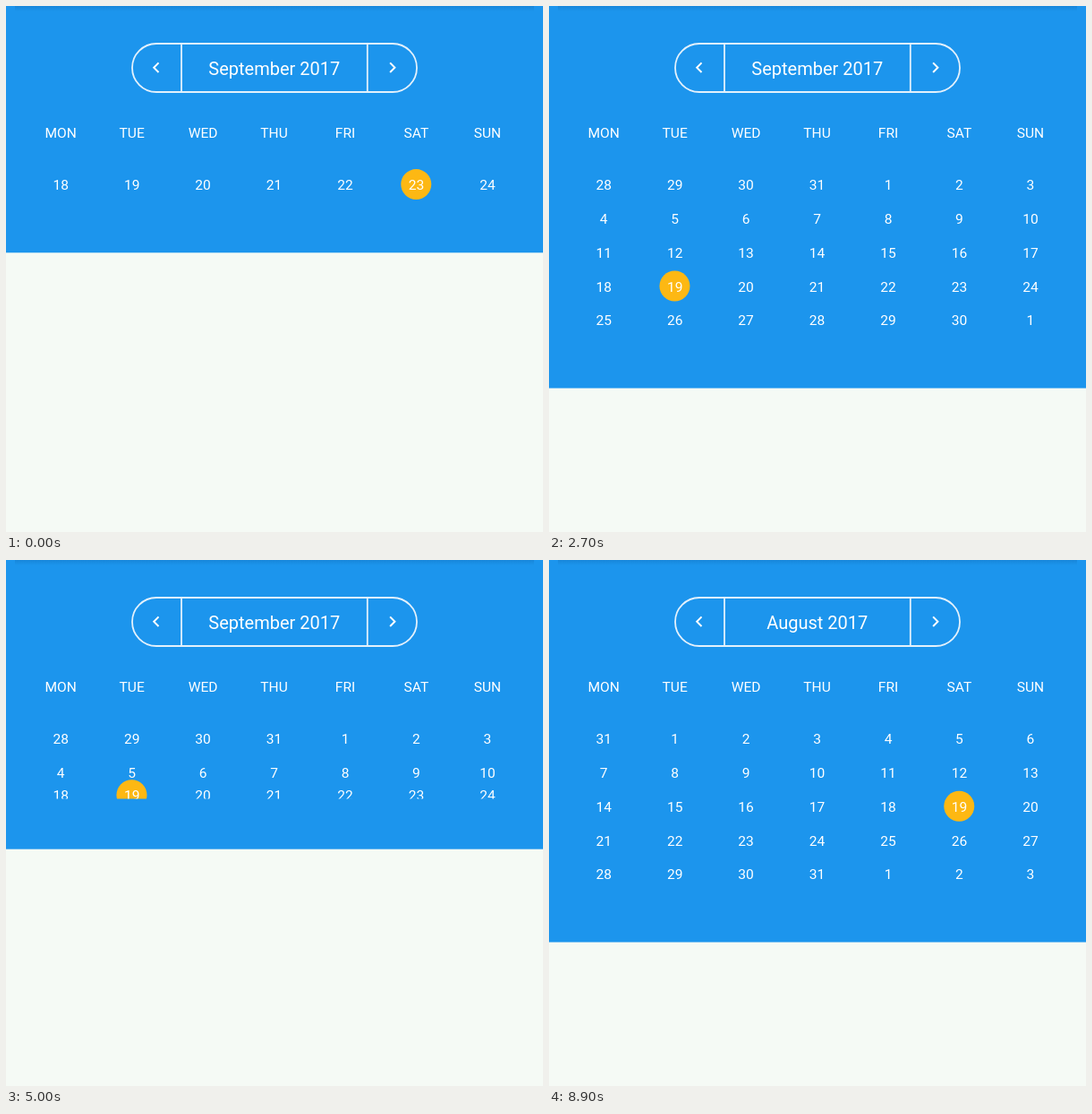
These frames come from a looping animation (600x587 px, 9 s). An HTML page:

```html
<!DOCTYPE html>
<html lang="en">
<head>
<meta charset="utf-8">
<title>Collapsible calendar</title>
<style>
  html, body { margin: 0; width: 100%; height: 100%; overflow: hidden; background: #f5faf5; }
  #stage { display: block; width: 600px; height: 587px; }
  text { font: 15.55px Roboto, sans-serif; fill: #fff; text-anchor: middle; }
  #title { font-size: 20px; }
  .outline { fill: none; stroke: #e3f1fc; stroke-width: 1.8; }
  .arrow { fill: #fff; }
  .dot { fill: #fdb813; }
</style>
</head>
<body>
<svg id="stage" viewBox="0 0 600 587">
  <defs>
    <linearGradient id="shade" x2="0" y2="1">
      <stop offset="0" stop-color="#0b5fa8" stop-opacity=".28"/>
      <stop offset="1" stop-color="#0b5fa8" stop-opacity="0"/>
    </linearGradient>
  </defs>
  <rect width="600" height="587" fill="#f5faf5"/>
  <rect id="panel" width="600" fill="#1c95ed"/>
  <rect x="10" width="580" height="6" fill="url(#shade)"/>
  <rect class="outline" x="141" y="42" width="318" height="54" rx="27"/>
  <path class="outline" d="M196 42v54M403.8 42v54"/>
  <path class="arrow" d="M171.2 64.1l-1.4-1.4-6 6 6 6 1.4-1.4-4.6-4.6z"/>
  <path class="arrow" d="M428.4 64.1l1.4-1.4 6 6-6 6-1.4-1.4 4.6-4.6z"/>
  <text id="title" x="299.8" y="77"></text>
  <g id="weekdays"></g>
  <svg id="weeks" y="180.4" width="600" overflow="hidden"></svg>
</svg>
<script>
const ROW = 37.8, WEEK_CLIP = 38.6, COLLAPSED = 275.3, LOOP = 9000, STEP = 100;
const columnX = i => 61.2 + 79.45 * i;
const clamp = (v, lo, hi) => Math.min(hi, Math.max(lo, v));
const byId = id => document.getElementById(id);

function add(parent, tag, attrs) {
  const node = document.createElementNS('http://www.w3.org/2000/svg', tag);
  for (const key in attrs) node.setAttribute(key, attrs[key]);
  return parent.appendChild(node);
}

'MON TUE WED THU FRI SAT SUN'.split(' ').forEach((name, i) => {
  add(byId('weekdays'), 'text', { x: columnX(i), y: 147.3 }).textContent = name;
});

const rows = Array.from({ length: 6 }, () => {
  const row = add(byId('weeks'), 'svg', { width: 600, overflow: 'hidden' });
  const dot = add(row, 'circle', { class: 'dot', cy: 18.7, r: 17 });
  const days = Array.from({ length: 7 }, (_, i) => add(row, 'text', { x: columnX(i), y: 24.9 }));
  return { row, dot, days };
});

// Month index and number of weeks on show
const SEPTEMBER = { name: 'September', month: 8, weeks: 5 };
const AUGUST = { name: 'August', month: 7, weeks: 5 };
const JULY = { name: 'July', month: 6, weeks: 6 };

// [time, openness] of the panel
const DRAG = [
  [0, 0], [2100, 0], [2200, .12], [2300, .404], [2400, .74], [2500, .95], [2600, 1],
  [3400, 1], [3500, .93], [3600, .78], [3700, .575], [3800, .36], [3900, .16], [4000, .04], [4100, 0],
  [4700, 0], [4900, .14], [5200, .66], [5400, .94], [5500, 1], [LOOP, 1]
];

function openness(t) {
  const i = DRAG.findIndex(([time]) => time > t);
  const [t0, a] = DRAG[i - 1], [t1, b] = DRAG[i];
  return a + (b - a) * (t - t0) / (t1 - t0);
}

function monthAt(t) {
  if (t < 6000) return SEPTEMBER;
  return t >= 7000 && t < 8400 ? JULY : AUGUST;
}

function draw(t) {
  const { name, month, weeks } = monthAt(t);
  const selected = t < 700 ? 23 : 19;
  const lead = (new Date(2017, month, 1).getDay() + 6) % 7;
  const cell = lead + selected - 1;
  const active = Math.floor(cell / 7);
  const grown = openness(t) * (weeks - 1) * ROW;
  // Earlier weeks unfold above the selected one, a little ahead of the panel
  const shift = Math.min(active * ROW, grown * 4 / 3);

  byId('title').textContent = name + ' 2017';
  byId('panel').setAttribute('height', COLLAPSED + grown);
  byId('weeks').setAttribute('height', WEEK_CLIP + grown);

  rows.forEach(({ row, dot, days }, r) => {
    const above = r < active;
    const height = above ? clamp(shift - r * ROW, 0, ROW) : ROW;
    row.setAttribute('y', above ? r * ROW : (r - active) * ROW + shift);
    row.setAttribute('height', height);
    row.style.display = r < weeks && height > 0 ? '' : 'none';
    dot.style.display = r === active ? '' : 'none';
    dot.setAttribute('cx', columnX(cell % 7) - .2);
    days.forEach((day, i) => {
      day.textContent = new Date(2017, month, r * 7 + i + 1 - lead).getDate();
    });
  });
}

const start = performance.now();
let shown = -1;
function tick() {
  const t = Math.floor((performance.now() - start) % LOOP / STEP) * STEP;
  if (t !== shown) draw(shown = t);
  requestAnimationFrame(tick);
}
tick();
</script>
</body>
</html>
```
